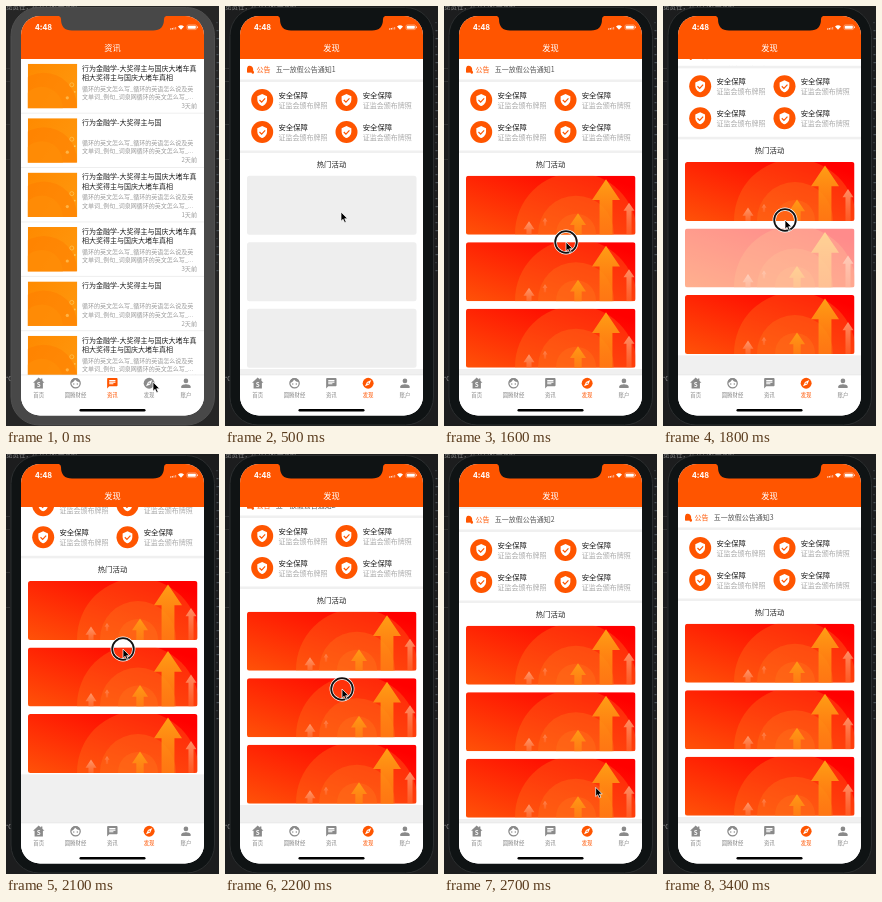
Animation, 213 px wide and 420 px high, one loop 3500 ms. Source, as an HTML page:

```html
<!DOCTYPE html>
<html>
<head>
<meta charset="utf-8">
<title>App demo</title>
<style>
html, body { margin: 0; width: 100%; height: 100%; overflow: hidden; background: #1c1d1e; }
svg { display: block; width: 100vw; height: 100vh; }
text { font-family: "Noto Sans CJK SC", "Noto Sans CJK", "Noto Sans", sans-serif; }
</style>
</head>
<body>
<svg id="stage" viewBox="0 0 213 420"></svg>
<script>
const LOOP = 3500, STEP = 100;
const ORANGE = '#ff5500', GREY = '#8a8a8a';

const rect = (x, y, w, h, fill, r = 0, more = '') =>
  `<rect x="${x}" y="${y}" width="${w}" height="${h}" rx="${r}" fill="${fill}" ${more}/>`;
const circle = (x, y, r, fill, more = '') =>
  `<circle cx="${x}" cy="${y}" r="${r}" fill="${fill}" ${more}/>`;
const path = (d, fill, more = '') => `<path d="${d}" fill="${fill}" ${more}/>`;
const group = (x, y, inner, scale = 1) =>
  `<g transform="translate(${x} ${y}) scale(${scale})">${inner}</g>`;
// y is the vertical middle of the glyphs
const label = (s, x, y, size, fill, anchor = 'start', more = '') =>
  `<text x="${x}" y="${(y + size * 0.37).toFixed(2)}" font-size="${size}" fill="${fill}" text-anchor="${anchor}" ${more}>${s}</text>`;

const SHIELD = 'M12 1L3 5v6c0 5.55 3.84 10.74 9 12 5.16-1.26 9-6.45 9-12V5z';
const ICONS = [
  path('M12 1L1 11h3v11h16V11h3l-4-3.6V3h-3v1.7z', 'currentColor') +
    label('S', 12, 14, 12, '#fff', 'middle', 'font-weight="700"'),
  circle(12, 12, 9, 'none', 'stroke="currentColor" stroke-width="2.4"') +
    path('M3 11Q9 11 11 5Q14 10 21 10Q19 2 12 2Q4 2 3 11', 'currentColor') +
    circle(8.6, 13.5, 1.4, 'currentColor') + circle(15.4, 13.5, 1.4, 'currentColor'),
  path('M20 2H4c-1.1 0-2 .9-2 2v18l4-4h14c1.1 0 2-.9 2-2V4c0-1.1-.9-2-2-2z', 'currentColor') +
    path('M6 6h12v2H6zM6 9h12v2H6zM6 12h8v2H6z', '#fff'),
  circle(12, 12, 10.5, 'currentColor') +
    path('M18 6l-3.8 8.2L6 18l3.8-8.2z', '#fff') + circle(12, 12, 1.3, 'currentColor'),
  circle(12, 7.5, 4.5, 'currentColor') +
    path('M12 14c-2.7 0-9 1.3-9 4.5V21h18v-2.5C21 15.3 14.7 14 12 14z', 'currentColor')
];
const TABS = ['首页', '圆腾财经', '资讯', '发现', '账户'];

function tabBar(active) {
  return rect(15, 369, 183, 41, '#fff') + rect(15, 368.7, 183, 0.5, '#dcdcdc') +
    TABS.map((name, i) => {
      const x = 32.7 + i * 36.8, color = i === active ? ORANGE : GREY;
      return `<g color="${color}">${group(x - 6.2, 371, ICONS[i], 0.52)}</g>` +
        label(name, x, 389.2, 5.4, color, 'middle');
    }).join('') + rect(73.5, 403, 66, 2.5, '#000', 1.25);
}

function header(title) {
  const bars = [0, 1, 2, 3].map(i =>
    rect(164 + i * 1.7, 22.4 - i * 0.5, 1.1, 1.2 + i * 0.5, '#fff', 0.3, i > 1 ? 'opacity=".5"' : '')).join('');
  return rect(15, 10, 183, 43, ORANGE) +
    label('4:48', 37.5, 21.4, 8.2, '#fff', 'middle', 'font-weight="700"') + bars +
    path('M172 20.5Q175 17.8 178 20.5L175 23.7z', '#fff') +
    rect(181, 18.9, 9.6, 4.7, 'none', 1.3, 'stroke="#fff" stroke-width=".5" opacity=".7"') +
    rect(181.8, 19.7, 8, 3.1, '#fff', 0.7) + rect(191.2, 20.4, 0.7, 1.7, '#fff') +
    label(title, 106.5, 42.4, 8.2, '#fff', 'middle');
}

function newsItem(i) {
  const y = 53.5 + i * 54.4, short = i % 3 === 1;
  const lines = short ? ['行为金融学-大奖得主与国']
    : ['行为金融学-大奖得主与国庆大堵车真', '相大奖得主与国庆大堵车真相'];
  return group(0, y,
    group(21.8, 4.3, '<use href="#thumb"/>') +
    lines.map((s, n) => label(s, 76, 8.6 + n * 9.6, 7, '#222')).join('') +
    label('循环的英文怎么写_循环的英语怎么说及英', 76, 28.8, 6, '#999') +
    label('文单词_例句_词泉网循环的英文怎么写_...', 76, 37.3, 6, '#999') +
    label(`${[3, 2, 1][i % 3]}天前`, 191, 46.2, 6.1, '#999', 'end') +
    rect(15, 53.2, 183, 0.9, '#ededed'));
}

function badge(x, y) {
  return circle(x, y, 11, ORANGE) +
    group(x - 6.5, y - 6.5, path(SHIELD, '#fff') +
      path('M7 12l4 4 6.5-7', 'none', `stroke="${ORANGE}" stroke-width="2.2"`), 0.54) +
    label('安全保障', x + 16.2, y - 4.7, 7.4, '#222', 'start', 'font-weight="500"') +
    label('证监会颁布牌照', x + 16.2, y + 5.3, 7, '#aaa');
}

const arrow = (x, y, w, h, fill, opacity) => {
  const s = w * 0.23, head = w * 0.74;
  return path(`M${x} ${y}L${x + w / 2} ${y + head}H${x + s}V${y + h}H${x - s}V${y + head}H${x - w / 2}z`,
    fill, `opacity="${opacity}"`);
};

const thumb = '<g clip-path="url(#thumbClip)">' + rect(0, 0, 49.5, 44.5, 'url(#amber)') +
  circle(16, 42, 33, '#ff7f00', 'opacity=".55"') +
  circle(14, 44, 21, '#ff8f08', 'opacity=".6"') +
  circle(44, 21, 2, 'none', 'stroke="#ffc050" stroke-width=".8"') +
  circle(39.5, 34, 1.6, '#ffb445') + circle(47, 28, 0.9, '#ffc050') + '</g>';

const banner = '<g clip-path="url(#cardClip)">' + rect(0, 0, 169.5, 59, 'url(#red)') +
  [61, 38, 20].map(r => circle(110, 58, r, '#ff7a1c', 'opacity=".32"')).join('') +
  arrow(140, 3.5, 28, 57, 'url(#gold)', 1) +
  arrow(163, 27, 11, 33, 'url(#pale)', 0.9) +
  arrow(112, 37.5, 16, 23, 'url(#gold)', 0.95) +
  arrow(63, 45.5, 11, 15, 'url(#pale)', 1) +
  arrow(79, 42, 5, 8, 'url(#pale)', 0.7) + '</g>';

const notices = [1, 2, 3].map((n, i) => label('五一放假公告通知' + n, 50.7, 63.3 + i * 20, 7, '#555')).join('');

const discover = rect(15, 53, 183, 20.5, '#fff') +
  path('M22 65.5Q21.5 59 25 59.8Q28.5 60.5 28.2 64.5L29 66.5L22.3 66.7z', ORANGE) +
  circle(27.8, 66.5, 1.2, ORANGE) +
  label('公告', 31.5, 63.3, 7, ORANGE) +
  `<g clip-path="url(#noticeClip)"><g id="notice">${notices}</g></g>` +
  rect(15, 76, 183, 68.5, '#fff') +
  [[37.2, 94], [121.5, 94], [37.2, 126], [121.5, 126]].map(p => badge(...p)).join('') +
  rect(15, 147, 183, 216, '#fff') +
  label('热门活动', 106.5, 158.4, 7.4, '#222', 'middle', 'font-weight="500"') +
  [0, 1, 2].map(i => group(22, 169.7 + i * 66.5,
    `<g class="blank">${rect(0, 0, 169.5, 59, '#eeeeee', 2.5)}</g>` +
    `<g class="banner"><use href="#banner"/></g>`)).join('');

const gradient = (id, dir, a, b, endAlpha = 1) =>
  `<linearGradient id="${id}" x1="${dir[0]}" y1="${dir[1]}" x2="${dir[2]}" y2="${dir[3]}">` +
  `<stop stop-color="${a}"/><stop offset="1" stop-color="${b}" stop-opacity="${endAlpha}"/></linearGradient>`;
const clip = (id, shape) => `<clipPath id="${id}">${shape}</clipPath>`;

const defs = '<defs>' +
  gradient('amber', [0, 0, 1, 0.6], '#ff8a00', '#ff960c') +
  gradient('red', [0, 1, 0.9, 0.1], '#ff5208', '#ff0000') +
  gradient('gold', [0, 0, 0, 1], '#ff9f14', '#ff8a14', 0.6) +
  gradient('pale', [0, 0, 0, 1], '#ff9a70', '#ff7a40', 0.45) +
  clip('screen', rect(15, 10, 183, 399.5, '#fff', 19)) +
  clip('body', rect(15, 53, 183, 316, '#fff')) +
  clip('noticeClip', rect(50, 54, 140, 19, '#fff')) +
  clip('cardClip', rect(0, 0, 169.5, 59, '#fff', 2.5)) +
  clip('thumbClip', rect(0, 0, 49.5, 44.5, '#fff')) +
  `<g id="thumb">${thumb}</g><g id="banner">${banner}</g></defs>`;

const desk = label('览责任，建立目标一致的', 0, 0.8, 6.5, '#8d8d8d') +
  label('°C', 0, 373, 6, '#9a9a9a') +
  [62, 75, 118, 153].map(y => rect(0, y, 4, 0.7, '#3c3c3c')).join('') +
  Array.from({ length: 32 }, (_, i) => rect(210.5, 16 + i * 8, 1 + i % 3, 1.2, '#4a5258')).join('');

const stage = document.getElementById('stage');
stage.innerHTML = defs + `<rect id="back" width="213" height="420"/>` + desk +
  `<rect id="bezel" x="5" y="1.5" width="203.5" height="417.5" rx="28" stroke-width="1"/>` +
  `<g clip-path="url(#screen)">${rect(15, 10, 183, 400, '#fff')}` +
  `<g id="news"><g clip-path="url(#body)">${[0, 1, 2, 3, 4, 5].map(newsItem).join('')}</g>` +
  header('资讯') + tabBar(2) + '</g>' +
  `<g id="discover">${rect(15, 53, 183, 316, '#f0f0f0')}` +
  `<g clip-path="url(#body)"><g id="page">${discover}</g></g>` + header('发现') + tabBar(3) + '</g>' +
  path('M51 9.5Q55 10 55 13Q55 24.5 66 24.5H147Q158 24.5 158 13Q158 10 162 9.5z', '#000', 'id="notch"') + '</g>' +
  `<g id="cursor"><g id="press">${circle(0, 0, 10.8, 'none', 'stroke="#fff" stroke-width="3.2"')}` +
  circle(0, 0, 10.8, 'none', 'stroke="#111" stroke-width="1.8"') + '</g>' +
  path('M0 0V9.2L2.1 7.3L3.6 10.6L5.2 9.9L3.7 6.7H6.6z', '#000', 'stroke="#fff" stroke-width=".7"') + '</g>';

const $ = id => document.getElementById(id);
const show = (el, on) => { el.style.display = on ? '' : 'none'; };
const blanks = [...document.querySelectorAll('.blank')];
const banners = [...document.querySelectorAll('.banner')];

// rows: time, value, value...
const CURSOR = [[0, 147, 376], [200, 146, 374], [300, 138, 325], [400, 122, 240], [500, 116, 206],
  [900, 122, 190], [1200, 131.6, 177], [1400, 128, 200], [1600, 122, 236], [1800, 122, 214],
  [2100, 117, 195], [2200, 117, 235], [2300, 117, 276], [2400, 117, 295], [2600, 120, 300], [2900, 215, 400]];
const SCROLL = [[1600, 0], [1700, -5], [1800, -13.7], [1900, -27], [2000, -38], [2100, -42.7],
  [2200, -12], [2300, 17], [2400, 23], [2500, 14], [2600, 6], [2700, 2], [2800, 0]];
const NOTICE = [[1700, 0], [2000, -20], [2800, -20], [3100, -40]];
const PRESSED = [[1600, 1], [1700, 0.65], [1800, 0.45], [1900, 0.7], [2000, 1]];
const LOADED = [[700, 0], [1000, 1]];

function at(rows, t) {
  const n = rows.findIndex(r => r[0] > t);
  if (n === 0) return rows[0].slice(1);
  if (n < 0) return rows[rows.length - 1].slice(1);
  const a = rows[n - 1], b = rows[n], k = (t - a[0]) / (b[0] - a[0]);
  return a.slice(1).map((v, i) => v + (b[i + 1] - v) * k);
}

function draw(t) {
  const onNews = t < 200, first = t < 100;
  const frame = first ? '#484848' : '#0f1314';
  $('back').setAttribute('fill', first ? '#262626' : '#1c1d1e');
  $('bezel').setAttribute('fill', frame);
  $('notch').setAttribute('fill', frame);
  $('bezel').setAttribute('stroke', first ? '#505050' : '#2b2e2f');
  show($('news'), onNews);
  show($('discover'), !onNews);
  $('page').setAttribute('transform', `translate(0 ${at(SCROLL, t)[0]})`);
  $('notice').setAttribute('transform', `translate(0 ${at(NOTICE, t)[0]})`);
  const loaded = at(LOADED, t)[0];
  banners.forEach((el, i) => { el.style.opacity = i === 1 ? loaded * at(PRESSED, t)[0] : loaded; });
  blanks.forEach(el => show(el, loaded < 1));
  $('cursor').setAttribute('transform', `translate(${at(CURSOR, t).join(' ')})`);
  show($('cursor'), t < 2900);
  show($('press'), t >= 1600 && t < 2400);
}

const start = performance.now();
function tick() {
  const t = (performance.now() - start) % LOOP;
  draw(Math.floor(t / STEP) * STEP);
  requestAnimationFrame(tick);
}
tick();
</script>
</body>
</html>
```
